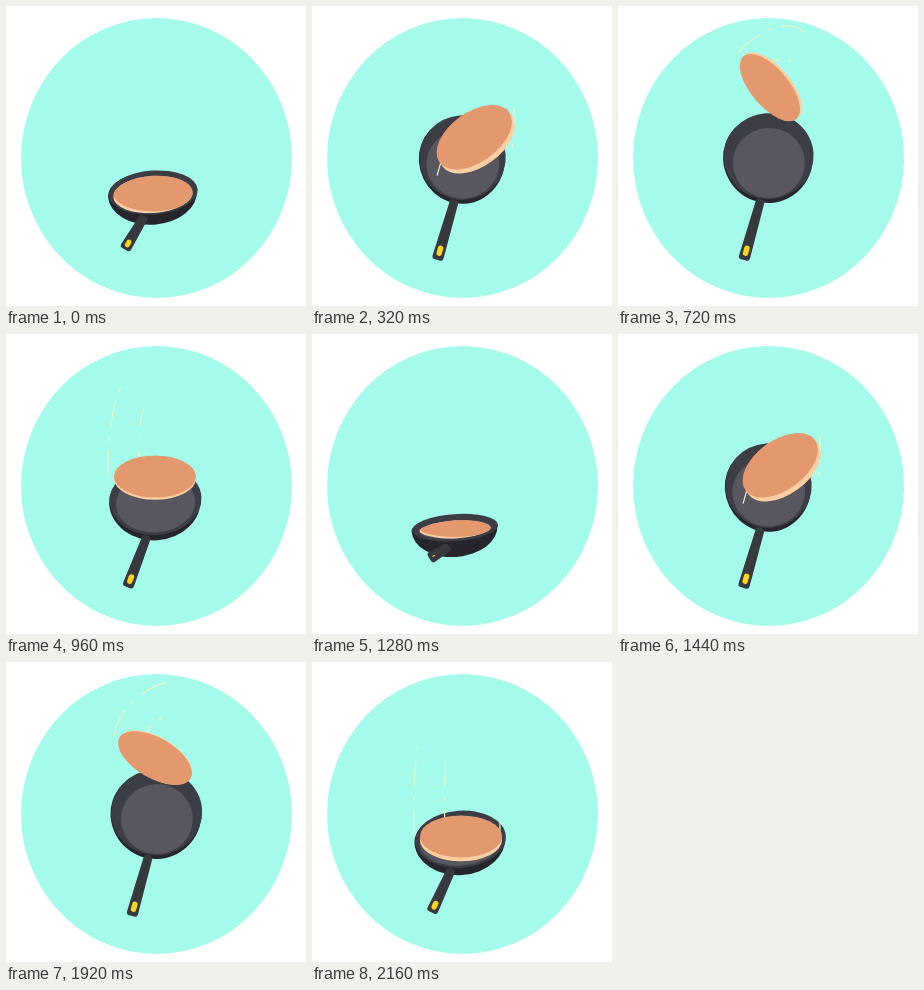
An HTML page that plays this animation: 300 px wide and 300 px high, repeating every 2240 ms.

```html
<!DOCTYPE html>
<html lang="en">
<head>
<meta charset="utf-8">
<title>Pancake flip</title>
<style>
  html, body { margin: 0; width: 100%; height: 100%; overflow: hidden; background: #fff; }
  svg { display: block; width: 100vw; height: 100vh; }
</style>
</head>
<body>
<svg viewBox="0 0 300 300">
  <defs><clipPath id="inside"><ellipse id="opening"/></clipPath></defs>
  <ellipse cx="150.5" cy="152" rx="135.5" ry="140" fill="#a5fbeb"/>
  <path id="body" fill="#26252d"/>
  <ellipse id="rim" fill="#3d3e45"/>
  <ellipse id="floor" fill="#585760"/>
  <path id="handle" fill="#38383f" stroke="#38383f" stroke-width="6" stroke-linejoin="round"/>
  <path id="grip" fill="none" stroke="#fcd41c" stroke-linecap="round"/>
  <path id="trail" fill="none" stroke="#eaf3c6" stroke-width="1.2" stroke-linecap="round" stroke-dasharray="26 10 3 12"/>
  <g id="cake">
    <path id="side" fill="#fccfa2"/>
    <ellipse id="face" fill="#e3986e"/>
  </g>
</svg>
<script>
const STEP = 80, STEPS = 14;
const DIP = 2;       // step at which the pan is lowest
const APEX = 5;      // steps from the dip to the top of the flight
const LANDED = 12;

const set = (id, attrs) => {
  const node = document.getElementById(id);
  for (const name in attrs) node.setAttribute(name, attrs[name]);
};
const clamp = (v, low, high) => Math.min(high, Math.max(low, v));
const mix = (a, b, t) => a + (b - a) * t;
const smooth = v => { const t = clamp(v, 0, 1); return t * t * (3 - 2 * t); };

// u counts steps since the dip; open runs from edge-on (0) to facing us (1)
function panAt(u) {
  const open = smooth(u / 2.2) * smooth((14.3 - u) / 6.5);
  const lift = open ** 1.45;
  const cx = mix(142.5, 150, Math.sqrt(open));
  const cy = mix(194.5, 151, lift);
  return {
    cx, cy,
    rx: 43 + 0.04 * u * u * open,
    ry: mix(13.5, 43, open),
    bottom: mix(223, 197, lift),
    floor: {
      cx: cx + 0.5,
      cy: cy + 1 + 5 * open ** 4,
      rx: 36 + 5 * Math.sin(Math.PI * open),
      ry: mix(9, 35, open ** 0.8)
    },
    neck: [mix(135, 142, open), mix(214, 196, open ** 2)],
    end: [mix(120, 126.5, open ** 3), mix(223, 251, 1 - (1 - open) ** 3)]
  };
}

// free flight: quick rise, slower fall, half a turn
function flightAt(u) {
  const swing = Math.max(0, Math.sin(Math.PI * Math.min(u, 8) / 7.5)) ** 1.2;
  const wobble = 6 * Math.sin(Math.PI * (u - 2) / 4);
  const turn = Math.max(-180, wobble - 18 * u);
  const rad = turn * Math.PI / 180;
  const cos = Math.cos(rad), sin = Math.sin(rad);
  const depth = clamp(1.6 * (8.6 - u), -5, 5);
  return {
    cx: 149 + 19 * swing,
    cy: 70 + (u < APEX ? 6.8 : 2.9) * (u - APEX) ** 2,
    rx: 41 + 4 * swing ** 2,
    ry: 15 + (cos > 0 ? 15 * cos * cos : -6 * cos),
    turn, cos, sin,
    dx: -sin * depth,
    dy: cos * depth
  };
}

function cakeAt(u, { floor }) {
  if (u < 1 || u >= LANDED) {
    return { ...floor, cy: floor.cy - 1.5, turn: 0, cos: 1, sin: 0, dx: 0, dy: floor.ry * 0.22 };
  }
  const cake = flightAt(u);
  cake.ry = Math.min(cake.ry, floor.ry + 4);
  return cake;
}

function drawPan({ cx, cy, rx, ry, bottom, floor, neck, end }) {
  const transform = `rotate(-4 ${cx} ${cy})`;
  const left = cx - rx, right = cx + rx;
  set('body', { d: `M${left} ${cy}A${rx} ${bottom - cy} 0 0 0 ${right} ${cy}A${rx} ${ry} 0 0 0 ${left} ${cy}`, transform });
  set('rim', { cx: cx + 0.7, cy: cy - 0.8, rx, ry, transform });
  set('floor', { ...floor, transform });
  set('opening', { ...floor, transform });

  const [x, y] = neck;
  const length = Math.hypot(end[0] - x, end[1] - y);
  const ux = (end[0] - x) / length, uy = (end[1] - y) / length;
  const at = (along, across) => `${x + ux * along - uy * across} ${y + uy * along + ux * across}`;
  set('handle', { d: `M${at(0, -1.4)}L${at(length, -2.7)}L${at(length, 2.7)}L${at(0, 1.4)}Z` });
  const shown = Math.min(1, length / 55);
  set('grip', {
    d: `M${at(length - 9 * shown, 0)}L${at(length - 4 * shown, 0)}`,
    'stroke-width': clamp((length - 13) / 4, 0.8, 5.4)
  });
}

function drawCake({ cx, cy, rx, ry, turn, cos, sin, dx, dy }, held) {
  set('cake', { 'clip-path': held ? 'url(#inside)' : 'none' });
  set('face', { cx, cy, rx, ry, transform: `rotate(${turn} ${cx} ${cy})` });
  const ex = rx * cos, ey = rx * sin;
  const oval = (x, y) =>
    `M${x - ex} ${y - ey}A${rx} ${ry} ${turn} 1 0 ${x + ex} ${y + ey}A${rx} ${ry} ${turn} 1 0 ${x - ex} ${y - ey}Z`;
  set('side', { d: oval(cx + dx, cy + dy) + oval(cx + dx / 2, cy + dy / 2) });
}

// path lately taken by a point on the long axis of the pancake
function wake(u, reach, lag) {
  const points = [];
  for (let back = 0; back <= lag; back += 0.2) {
    const { cx, cy, rx, cos, sin } = flightAt(Math.max(1.3, u - back));
    points.push(`${cx + reach * rx * cos} ${cy + reach * rx * sin}`);
  }
  return 'M' + points.join('L');
}

let last = -1;
function frame() {
  const step = Math.floor(performance.now() / STEP) % STEPS;
  if (step !== last) {
    last = step;
    const u = (step + STEPS - DIP) % STEPS;
    const pan = panAt(u);
    const flying = u >= 2 && u < LANDED;
    drawPan(pan);
    drawCake(cakeAt(u, pan), u < 1 || u >= LANDED);
    set('trail', { d: flying ? wake(u, 1.15, 3) + wake(u, 0.4, 2.6) + wake(u, -0.95, 0.6) : '' });
  }
  requestAnimationFrame(frame);
}
frame();
</script>
</body>
</html>
```
